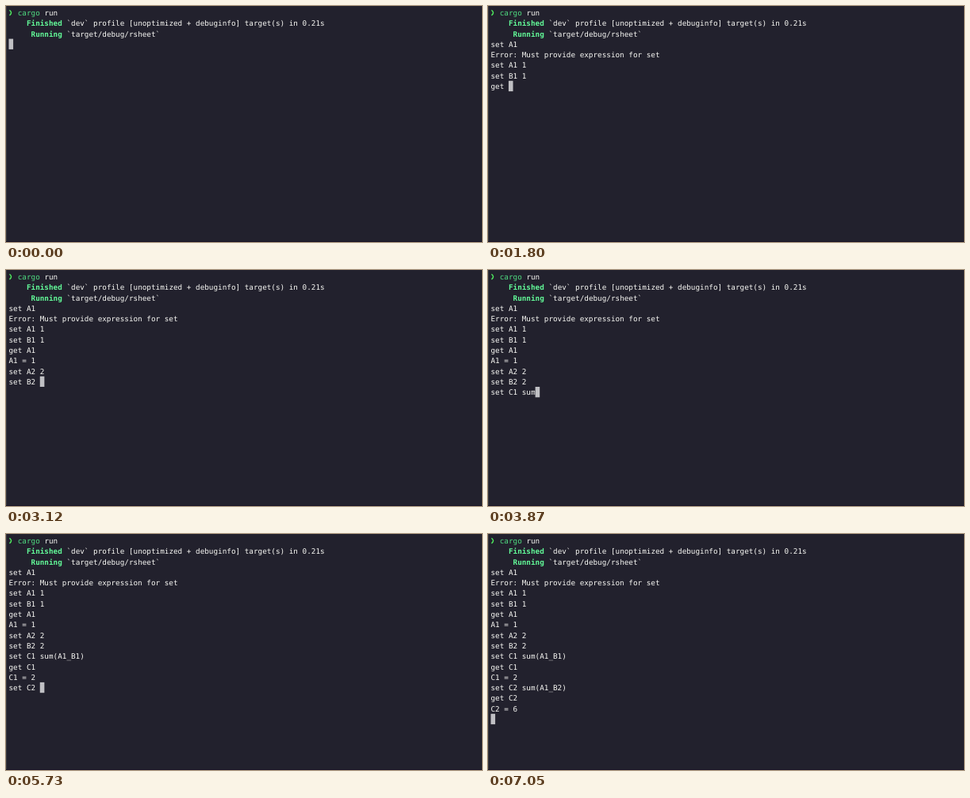
These frames come from a looping animation (600x299 px, 7.08 s). An HTML page:

```html
<!DOCTYPE html>
<html lang="en">
<head>
<meta charset="utf-8">
<title>Terminal session</title>
<style>
  html, body { margin: 0; width: 100%; height: 100%; overflow: hidden; background: #22212d; }
  svg { display: block; width: 600px; height: 299px; }
  text {
    font: 9.32px "DejaVu Sans Mono", "Noto Sans Mono", monospace;
    fill: #f8f8f4;
    white-space: pre;
    text-rendering: geometricPrecision;
  }
  .bold { fill: #62f998; font-weight: bold; }
  .command { fill: #4fdc80; }
</style>
</head>
<body>
<svg id="stage" viewBox="0 0 600 299" xmlns="http://www.w3.org/2000/svg">
  <rect width="600" height="299" fill="#22212d"/>
  <rect width="1" height="299" fill="#3b3b40"/>
  <rect y="298" width="600" height="1" fill="#1b1527"/>
  <path d="M4.5 5.3Q8.7 8.6 4.5 11.9" fill="none" stroke="#50f060" stroke-width="1.4"/>
  <rect id="cursor" width="5.6" height="13.3"/>
</svg>
<script>
const LOOP = 7080;
const LEFT = 3.5, CELL = 5.611, TOP = 1.7, ROW = 13.3, BASELINE = 10.2;
const FIRST_ROW = 3;

const commands = [
  { start: 30, text: "set A1", reply: "Error: Must provide expression for set" },
  { start: 600, text: "set A1 1" },
  { start: 1200, text: "set B1 1" },
  { start: 1710, text: "get A1", reply: "A1 = 1" },
  { start: 2100, text: "set A2 2" },
  { start: 2850, text: "set B2 2" },
  { start: 3480, text: "set C1 sum(A1_B1)" },
  { start: 4830, text: "get C1", reply: "C1 = 2" },
  { start: 5460, text: "set C2 sum(A1_B2)" },
  { start: 6750, text: "get C2", reply: "C2 = 6" }
];

// Milliseconds needed to reach a key: shifted keys are slower.
function keyDelay(key) {
  if (/[a-z ]/.test(key)) return 30;
  if (/[A-Z]/.test(key)) return 90;
  return /[(_)]/.test(key) ? 120 : 60;
}

function keysPressed({ start, text }, time) {
  const keys = text + "\n";
  let count = 0;
  for (let at = start; count < keys.length && at <= time; at += keyDelay(keys[count])) count++;
  return count;
}

const stage = document.getElementById("stage");
const cursor = document.getElementById("cursor");
cursor.setAttribute("fill", "#c0c0c4");

function addText(row, col = 0, content = "", className = "") {
  const node = document.createElementNS(stage.namespaceURI, "text");
  node.setAttribute("x", LEFT + col * CELL);
  node.setAttribute("y", TOP + row * ROW + BASELINE);
  node.setAttribute("class", className);
  node.textContent = content;
  return stage.appendChild(node);
}

addText(0, 2, "cargo", "command");
addText(0, 8, "run");
addText(1, 4, "Finished", "bold");
addText(1, 13, "`dev` profile [unoptimized + debuginfo] target(s) in 0.21s");
addText(2, 5, "Running", "bold");
addText(2, 13, "`target/debug/rsheet`");

const rows = Array.from({ length: 15 }, (_, i) => addText(FIRST_ROW + i));

function linesAt(time) {
  const lines = [];
  for (const command of commands) {
    const { text, reply } = command;
    const pressed = keysPressed(command, time);
    lines.push(text.slice(0, pressed));
    if (pressed <= text.length) return lines;
    if (reply) lines.push(reply);
  }
  return [...lines, ""];
}

function draw(time) {
  const lines = linesAt(time);
  rows.forEach((node, i) => {
    const line = lines[i] || "";
    if (node.textContent !== line) node.textContent = line;
  });
  const last = lines.length - 1;
  cursor.setAttribute("x", LEFT + lines[last].length * CELL);
  cursor.setAttribute("y", TOP + (FIRST_ROW + last) * ROW);
}

function frame() {
  draw(performance.now() % LOOP);
  requestAnimationFrame(frame);
}

draw(0);
requestAnimationFrame(frame);
</script>
</body>
</html>
```
